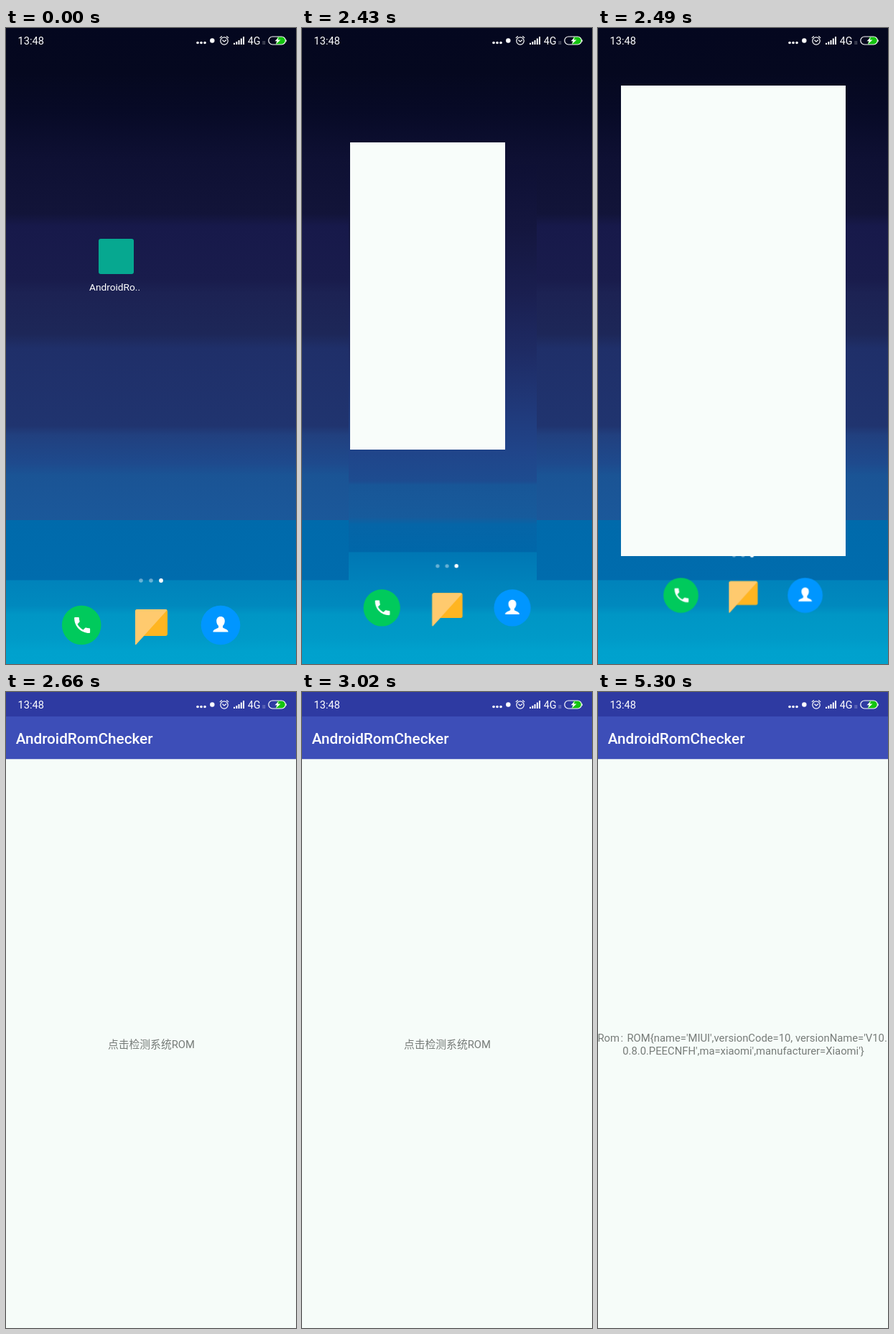
Write an HTML page that moves like this. It is 404 by 884 pixels and loops after 7.26 s.

```html
<!DOCTYPE html>
<html lang="zh">
<head>
<meta charset="utf-8">
<title>App launch</title>
<style>
html, body { margin: 0; width: 100%; height: 100%; overflow: hidden; background: #04071f; }
#stage { position: relative; width: 404px; height: 884px; overflow: hidden; }
svg { position: absolute; left: 0; top: 0; display: block; overflow: visible; }
text { font-family: Roboto, "Noto Sans CJK SC", "Noto Sans CJK", sans-serif; white-space: pre; }

#wall {
  position: absolute; inset: 0;
  background: linear-gradient(#04071f 0, #05081f 60px, #070a26 115px, #0e1033 180px,
    #121439 258px, #17194a 275px, #191c4c 350px, #1c2253 368px, #1d2758 425px,
    #1f2f69 445px, #20346f 553px, #21407f 566px, #1e4a8d 605px, #1a5495 622px,
    #1b589a 684px, #006aab 684px, #006cad 767px, #0083bb 768px, #0089be 803px,
    #0096c5 815px, #009ac8 848px, #00a1cd 866px, #00a2ce 884px);
}
#shade {
  position: absolute; left: 65px; top: 190px; width: 262px; height: 578px;
  background: linear-gradient(#0e1034 0, #14163f 90px, #1a1f50 180px, #1e2b64 260px,
    #20397a 340px, #20458a 400px, #1d4c90 440px, #185697 445px, #175b9c 490px,
    #0565a7 500px, #0067a9 538px, #0077b4 539px, #0081ba 578px);
}
#win { position: absolute; overflow: hidden; background: #f8fdfa; }

/* One 7260 ms loop, all hard steps */
#shade, #win, .home, .app, .ask, .result { animation: 7260ms step-end infinite; }
#shade { animation-name: shade; }
#win { animation-name: win; }
.home { animation-name: home; transform-origin: 202px 442px; }
.app { animation-name: app; transform-origin: 0 0; }
.ask { animation-name: ask; }
.result { animation-name: result; }

@keyframes shade {
  0%, 34.297%, 100% { opacity: 0; }
  33.471% { opacity: 1; }
}
@keyframes win {
  0%, 100% { left: 0; top: 0; width: 0; height: 0; }
  33.471% { left: 67px; top: 159px; width: 216px; height: 427px; }
  34.297% { left: 32px; top: 79.5px; width: 312.5px; height: 654.5px; }
  35.537% { left: 0; top: 3px; width: 403px; height: 873px; }
  36.639% { left: 0; top: 0; width: 404px; height: 884px; }
}
@keyframes home {
  0%, 100% { transform: none; }
  33.471% { transform: scale(.938); }
  34.297% { transform: scale(.893); }
}
@keyframes app {
  0%, 100% { opacity: 0; transform: none; }
  35.537% { opacity: .35; transform: translate(2.5px, 1.4px) scale(.985); }
  36.639% { opacity: 1; transform: none; }
}
@keyframes ask {
  0%, 100% { opacity: 1; }
  73.002% { opacity: 0; }
}
@keyframes result {
  0%, 100% { opacity: 0; }
  73.002% { opacity: 1; }
}
</style>
</head>
<body>
<div id="stage">
  <div id="wall"></div>
  <div id="shade"></div>

  <svg width="404" height="884">
    <g class="home" fill="#fff">
      <rect x="129" y="293" width="49" height="49" rx="3" fill="#06a890"/>
      <text x="151.5" y="364.5" font-size="13.7" text-anchor="middle">AndroidRo..</text>

      <circle cx="188" cy="768" r="2.8" opacity=".4"/>
      <circle cx="202" cy="768" r="2.8" opacity=".4"/>
      <circle cx="216" cy="768" r="2.9"/>

      <!-- Phone -->
      <circle cx="105.2" cy="830" r="27.3" fill="#00ca5c"/>
      <path transform="translate(91.5 815.3) scale(1.22)" d="M6.6 10.8c1.4 2.8 3.8 5.1 6.6 6.6l2.2-2.2c.3-.3.7-.4 1-.2 1.1.4 2.300.6 3.600.6.600 0 1 .4 1 1V20c0 .6-.4 1-1 1C10.600 21 3 13.400 3 4c0-.600.400-1 1-1h3.500c.600 0 1 .400 1 1 0 1.200.200 2.400.600 3.600.100.300 0 .700-.300 1z"/>

      <!-- Messages -->
      <path fill="#ffb521" d="M183 808H222q3 0 3 3V842q0 3-3 3H192L181.500 856.500Q180 858 180 856V811q0-3 3-3z"/>
      <path fill="#ffca6e" d="M183 808H222q1.500 0 2.300 1.200L181.500 856.500Q180 858 180 856V811q0-3 3-3z"/>

      <!-- Contacts -->
      <circle cx="299" cy="830" r="27.3" fill="#0096ff"/>
      <path d="M299 818c3.800 0 5.800 2.600 5.800 6.200 0 3-1.200 5.200-2.800 6.800v2.200c.600 1.600 7.600 2 7.600 6.300H288.400c0-4.300 7-4.700 7.600-6.300V831c-1.600-1.600-2.800-3.800-2.800-6.800 0-3.600 2-6.200 5.800-6.200z"/>
    </g>
  </svg>

  <div id="win">
    <svg width="404" height="884">
      <g class="app">
        <rect x="-10" y="-10" width="424" height="904" fill="#f6fcf9"/>
        <rect x="-10" y="-10" width="424" height="45" fill="#2e3aa2"/>
        <rect x="-10" y="34" width="424" height="59" fill="#3d4eb8"/>
        <rect x="-10" y="93" width="424" height="1" fill="#c9d0e6"/>
        <text x="13.700" y="72" font-size="20.7" font-weight="500" fill="#fff">AndroidRomChecker</text>
        <g font-size="14.800" fill="#777c79">
          <text class="ask" x="202.4" y="494.600" text-anchor="middle">点击检测系统ROM</text>
          <g class="result">
            <text x="-.5" y="486">Rom<tspan dx="1.500">:</tspan></text>
            <text x="40.500" y="486">ROM{name='MIUI',versionCode=10, versionName='V10.</text>
            <text x="202.500" y="504" text-anchor="middle">0.8.0.PEECNFH',ma=xiaomi',manufacturer=Xiaomi'}</text>
          </g>
        </g>
      </g>
    </svg>
  </div>

  <!-- Status bar -->
  <svg width="404" height="40" fill="#fff">
    <text x="16.500" y="23.300" font-size="14.600">13:48</text>
    <circle cx="267" cy="20.500" r="1.800"/>
    <circle cx="272" cy="20.500" r="1.800"/>
    <circle cx="277" cy="20.500" r="1.800"/>
    <circle cx="287.300" cy="17.500" r="3.200"/>
    <g fill="none" stroke="#fff" stroke-width="1.200" stroke-linecap="round">
      <circle cx="304" cy="18" r="5.200"/>
      <path d="M298.200 13.600l2.200-1.900M309.800 13.600l-2.200-1.900M301.800 17l2.200 2 2.600-2.200"/>
    </g>
    <path d="M317 20.800h2V23h-2zM320.300 19h2v4h-2zM323.500 17h2v6h-2zM326.800 14.500h2V23h-2zM330 12h2v11h-2z"/>
    <text x="336.700" y="23" font-size="14.200">4G</text>
    <path d="M358.200 18v5M360.300 18v5" stroke="#fff" stroke-width="1" opacity=".4"/>
    <path d="M378 12.300h6.500a5 5 0 0 1 0 10.400H376z" fill="#14c40f"/>
    <rect x="365.800" y="12" width="23.600" height="11" rx="5.400" fill="none" stroke="#fff" stroke-width="1.200"/>
    <path d="M390 15.500q1.500 2 0 4z"/>
    <path d="M380 12.800l-5.500 5.400h3.200L376 22.600l6.500-6h-3.700z"/>
  </svg>
</div>
</body>
</html>
```
